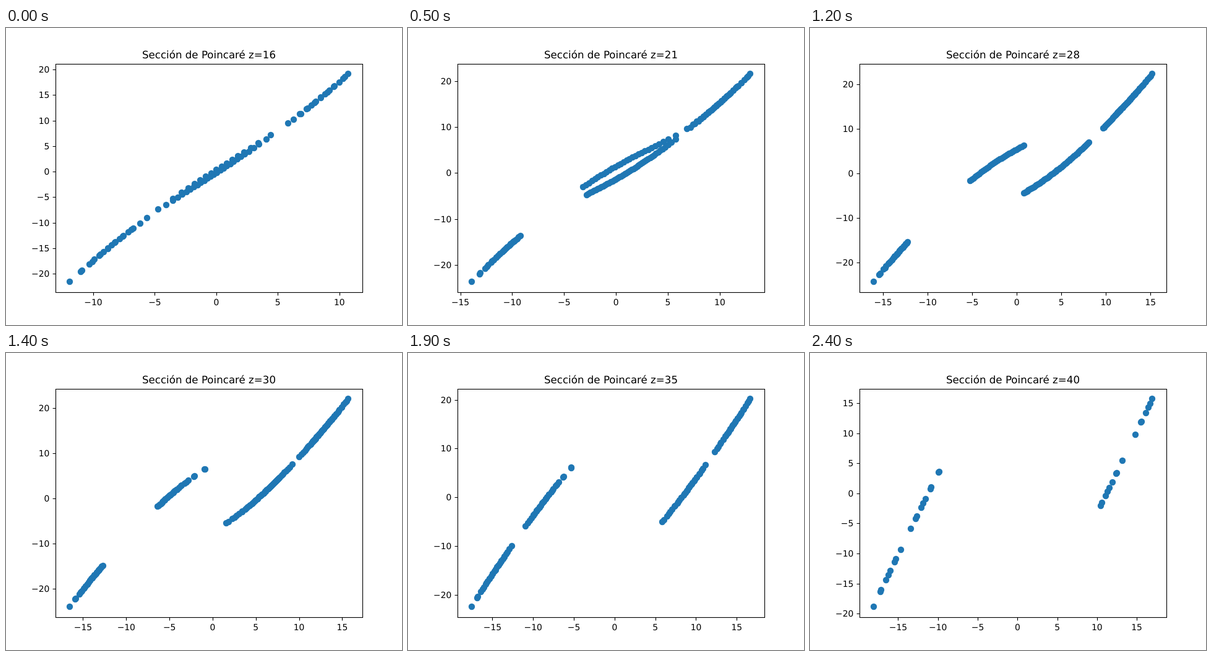
An HTML page that plays this animation: 640x480 px, repeating every 2.5 s.

```html
<!DOCTYPE html>
<html lang="es">
<head>
<meta charset="utf-8">
<title>Sección de Poincaré</title>
<style>
  html, body { margin: 0; width: 100%; height: 100%; overflow: hidden; background: #fff; }
  svg { display: block; width: 640px; height: 480px; font: 13.889px "DejaVu Sans", sans-serif; }
  text { text-rendering: geometricPrecision; }
</style>
</head>
<body>
<svg id="stage" viewBox="0 0 640 480">
  <rect width="640" height="480" fill="#fff"/>
  <g id="dots" fill="#1f77b4"></g>
  <path id="ticks" stroke="#000" stroke-width="1.11"/>
  <rect x="80.5" y="58.5" width="496" height="369" fill="none" stroke="#000" stroke-width="1.11"/>
  <g id="labels"></g>
  <text id="title" x="328" y="49" font-size="16.667" text-anchor="middle"></text>
</svg>
<script>
const FIRST = 16, LAST = 40, START = 28, STEP_MS = 100;
const AXES = { left: 80, right: 576, top: 57.6, bottom: 427.2 };
const el = id => document.getElementById(id);

// The Lorenz system
const flow = ([x, y, z]) => [10 * (y - x), x * (28 - z) - y, x * y - 8 * z / 3];
const move = (p, v, h) => p.map((c, i) => c + v[i] * h);

function rungeKutta(p, h) {
  const a = flow(p), b = flow(move(p, a, h / 2));
  const c = flow(move(p, b, h / 2)), d = flow(move(p, c, h));
  return p.map((v, i) => v + h * (a[i] + 2 * b[i] + 2 * c[i] + d[i]) / 6);
}

// Crossings of integer heights, by height, until the path falls through START.
function trace(p) {
  const crossings = [];
  for (let n = 0; n < 3000; n++) {
    const q = rungeKutta(p, 0.001);
    if (n && p[2] >= START && q[2] < START) break;
    if (Math.floor(p[2]) !== Math.floor(q[2])) {
      const level = Math.floor(Math.max(p[2], q[2]));
      const f = (level - p[2]) / (q[2] - p[2]);
      (crossings[level] ||= []).push(move(p, move(q, p, -1), f));
    }
    p = q;
  }
  return crossings;
}

// The two outermost turns bound the plot; their first crossing is the rising one.
const lowEdge = trace([-11.93, -21.6, FIRST - 1e-6]);
const highEdge = trace([10.74, 19.1, FIRST - 1e-6]);
const loops = [lowEdge, highEdge];

// Evenly spread turns that begin on the falling side of each lobe.
const fallingY = x => -5.34 + 1.078 * x + 0.0535 * x * x;
function addLoops(side, from, to, count) {
  for (let i = 0; i < count; i++) {
    const x = from + (to - from) * i / (count - 1);
    loops.push(trace([side * x, side * fallingY(x), START]));
  }
}
addLoops(-1, -0.83, 5.2, 30);
addLoops(1, 0.83, 8.1, 58);

function scale(min, max, from, to) {
  const pad = (max - min) * 0.05, lo = min - pad, hi = max + pad;
  const map = v => from + (v - lo) / (hi - lo) * (to - from);
  const step = hi - lo > 45 ? 10 : 5, ticks = [];
  for (let v = Math.ceil(lo / step) * step; v <= hi; v += step) ticks.push(v);
  return { map, pixel: v => Math.round(map(v)), ticks };
}

const label = (v, x, y, anchor) =>
  `<text x="${x}" y="${y}" text-anchor="${anchor}">${v < 0 ? "\u2212" : ""}${Math.abs(v)}</text>`;

function draw(z) {
  const [xMin, yMin] = lowEdge[z][0], [xMax, yMax] = highEdge[z][0];
  const sx = scale(xMin, xMax, AXES.left, AXES.right);
  const sy = scale(yMin, yMax, AXES.bottom, AXES.top);
  const inside = ([x, y]) => x >= xMin && x <= xMax && y >= yMin && y <= yMax;
  const points = loops.flatMap(loop => loop[z] || []).filter(inside);

  el("dots").innerHTML = points.map(([x, y]) =>
    `<circle cx="${sx.pixel(x)}" cy="${sy.pixel(y)}" r="5.21"/>`).join("");
  el("ticks").setAttribute("d",
    sx.ticks.map(v => `M${sx.pixel(v) + 0.5} 428V432.4`).join("") +
    sy.ticks.map(v => `M80 ${sy.pixel(v) + 0.5}H75.6`).join(""));
  el("labels").innerHTML =
    sx.ticks.map(v => label(v, sx.map(v), 448, "middle")).join("") +
    sy.ticks.map(v => label(v, 70.3, sy.pixel(v) + 5, "end")).join("");
  el("title").textContent = `Sección de Poincaré z=${z}`;
}

let shown;
function tick() {
  const z = FIRST + Math.floor(performance.now() / STEP_MS) % (LAST - FIRST + 1);
  if (z !== shown) draw(shown = z);
  requestAnimationFrame(tick);
}
tick();
</script>
</body>
</html>
```
